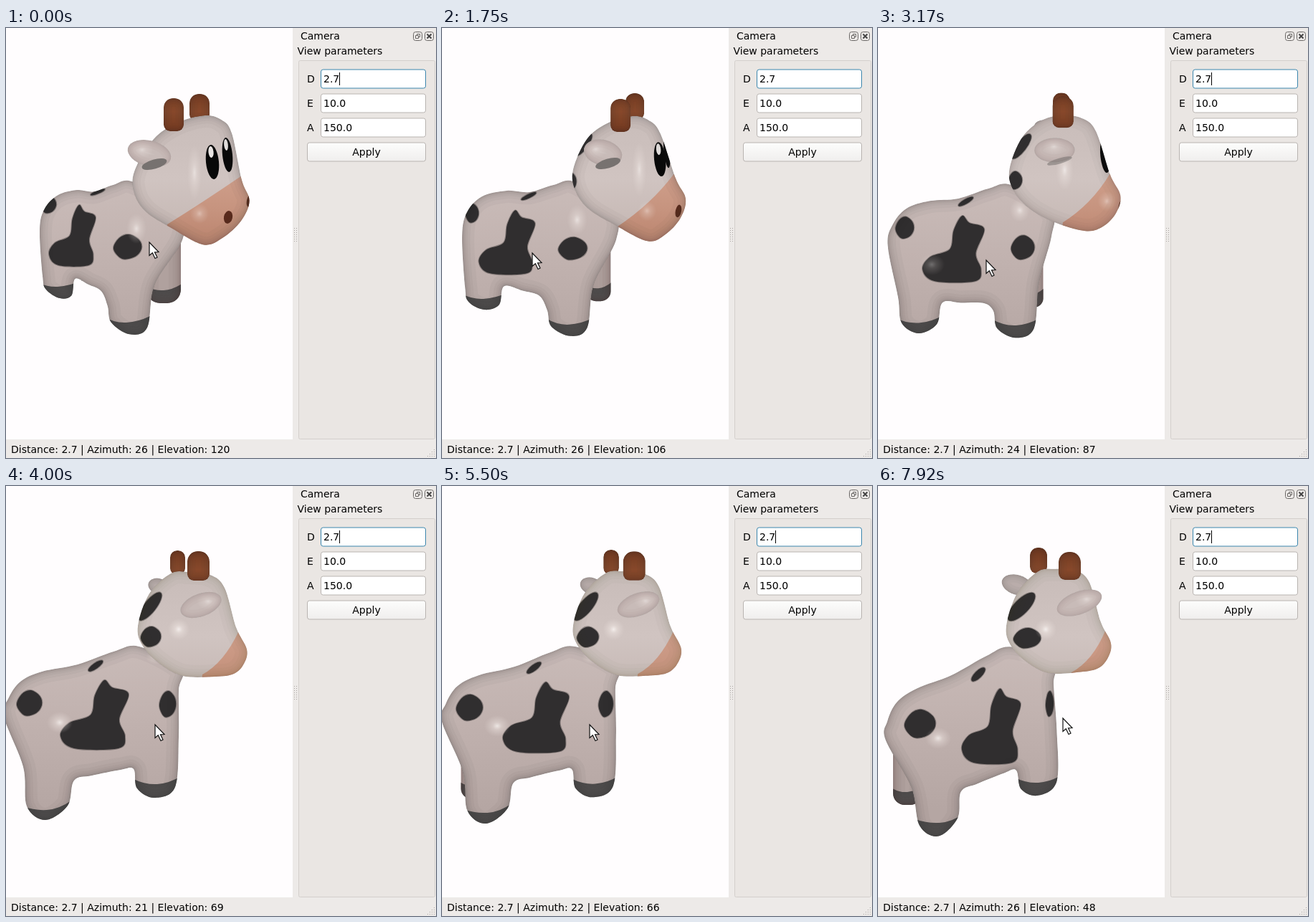
An HTML page with a canvas that plays this animation: 600 by 600 pixels, repeating every 8000 ms.

```html
<!DOCTYPE html>
<html lang="en">
<head>
<meta charset="utf-8">
<title>Camera</title>
<style>
html, body { margin: 0; width: 100%; height: 100%; overflow: hidden; background: #edeae8; }
#stage { position: absolute; left: 0; top: 0; width: 600px; height: 600px; overflow: hidden; font: 14px "DejaVu Sans", sans-serif; color: #111; }
canvas, svg { position: absolute; left: 0; top: 0; }
text { white-space: pre; }
</style>
</head>
<body>
<div id="stage">
<canvas id="view" width="400" height="574"></canvas>
<svg width="600" height="600">
  <defs>
    <linearGradient id="face" x2="0" y2="1"><stop stop-color="#fdfdfc"/><stop offset="1" stop-color="#f0eeed"/></linearGradient>
    <pattern id="dots" width="3" height="3" patternUnits="userSpaceOnUse"><rect width="1" height="1" fill="#aaa5a2"/></pattern>
  </defs>
  <rect x="408.5" y="45.5" width="190" height="528" rx="2" fill="#eae6e3" stroke="#d3cfcc"/>
  <rect x="402" y="278" width="4" height="20" fill="url(#dots)"/>
  <path d="M586 598L598 586V598Z" fill="url(#dots)"/>
  <g fill="none" stroke="#6b6866">
    <rect x="568.5" y="5.5" width="12" height="12" rx="3"/>
    <rect x="584.5" y="5.5" width="12" height="12" rx="3"/>
    <path d="M573.5 10V8.5h4v4h-2M571.5 10.5h4v4h-4z"/>
    <path d="M587.5 8.5l6 6m0-6l-6 6" stroke="#444" stroke-width="2"/>
  </g>
  <text x="411" y="16">Camera</text>
  <text x="406.5" y="37">View parameters</text>
  <g id="fields"></g>
  <rect x="420.5" y="160" width="165" height="26" rx="3" fill="url(#face)" stroke="#b9b4b1"/>
  <text x="503" y="178" text-anchor="middle">Apply</text>
  <rect id="caret" x="465" y="62" width="1" height="18"/>
  <text id="status" x="7" y="593"></text>
  <path id="pointer" d="M0 0V18.5L4.300 14.800L8 22.500L11 21L7.500 13.800L13 13.500Z" fill="#fff" stroke="#111" stroke-width="1.2"/>
</svg>
</div>
<script>
const LOOP = 8000, STEP = LOOP / 96;
const byId = id => document.getElementById(id);
const ctx = byId('view').getContext('2d');

byId('fields').innerHTML = ['D 2.7', 'E 10.0', 'A 150.0'].map((row, i) => {
  const [label, value] = row.split(' '), y = 58 + i * 34;
  return `<rect x="439.5" y="${y}" width="146" height="26" rx="3" fill="#fff" stroke="${i ? '#b9b4b1' : '#3b86ad'}"/>
    <text x="420" y="${y + 18}">${label}</text><text x="443" y="${y + 18}">${value}</text>`;
}).join('');

// time, turn, pointer x, pointer y, azimuth, elevation
const track = [
  [0, 0, 200, 299, 26, 120],
  [830, .88, 152, 311, 26, 112],
  [2500, 1, 105, 317, 26, 102],
  [4000, 2, 208, 333, 21, 69],
  [5500, 2.22, 206, 333, 22, 66],
  [6920, 2.38, 146, 320, 26, 54],
  [7920, 3, 258, 324, 26, 48]
];

// Outlines at turn 1 and turn 2; the warps carry them on to turn 0 and turn 3.
const body = {
  side: [186,215, 156,219, 122,229, 90,227, 55,235, 34,257, 27,290, 31,362, 36,383, 58,394, 79,387, 86,361, 112,367, 136,374, 147,394, 153,417, 180,430, 203,418, 212,358, 243,295, 240,255],
  rear: [186,224, 150,231, 100,249, 50,259, 20,273, 3,297, -3,322, 24,392, 29,447, 55,466, 86,446, 95,411, 120,404, 160,396, 178,395, 183,422, 207,435, 236,420, 241,350, 241,285, 244,255],
  before: (x, y) => [6 + 14 * Math.cos(Math.PI * (x - 27) / 150), -Math.max(0, 200 - x) * (y - 215) / 1500],
  after: (x, y) => [(y - 225) * (.14 - .0003 * x), 32 - .17 * x]
};
const head = {
  side: [265,123, 288,129, 304,147, 326,210, 340,238, 333,265, 312,288, 287,297, 241,274, 206,253, 187,228, 183,198, 202,155, 230,133],
  rear: [255,120, 285,124, 305,142, 321,197, 336,228, 332,248, 318,262, 292,266, 246,265, 213,247, 190,222, 184,195, 200,150, 230,122],
  before: (x, y) => [8 - (y - 150) * .15 + (x - 260) * .06, (y - 150) * .035],
  after: x => [-5 - (x - 184) * .04, -(x - 184) * .06]
};

// Spot outlines, placed by boxes: x, y, width, height at turns 0 to 3.
const splash = [137,271, 148,281, 171,290, 158,325, 166,348, 157,365, 95,365, 76,348, 88,330, 118,319, 124,292];
const blob = [172,288, 186,296, 189,308, 180,319, 162,322, 150,308, 158,293];
const boxes = {
  big: [[60,247,65,84], [51,255,79,88], [76,271,95,95], [117,283,82,103]],
  front: [[150,288,39,34], [163,292,40,31], [214,286,23,36], [234,286,11,35]],
  rump: [[48,234,22,24], [32,246,18,26], [15,285,35,35], [37,312,43,39]],
  back: [[118,225,20,8], [110,230,21,10], [115,244,20,14], [131,254,18,18]],
  crown: [null, [188,148,22,30], [186,149,30,38], [182,150,36,37]],
  nape: [null, [177,203,12,22], [188,196,28,28], [189,198,38,28]],
  horn: [[220,98,28,46], [236,99,28,46], [253,91,31,41], [252,92,31,39]],
  farHorn: [[256,92,28,38], [256,91,26,37], [229,90,21,34], [212,86,24,36]]
};
const spots = {
  ear: [[200,175,31,18], [226,174,27,18], [272,166,30,16], [281,163,33,16]],
  farEar: [null, null, [213,140,15,11], [194,138,22,14]],
  eye: [[288,187,9], [305,183,8], [332,172,5]],
  farEye: [[309,177,7], [314,171,4], [338,160,3]],
  nostril: [[310,264,6], [331,255,4], [350,240,3]],
  farNostril: [[340,241,4], [350,236,3]],
  hoof: [[72,361], [57,379], [57,452], [86,470]],
  frontHoof: [[168,411], [178,414], [211,416], [224,414]],
  farFront: [[220,384,24], [218,381,17], [212,400,13]],
  farHind: [null, null, [45,434,17], [41,445,20]],
  faceLight: [[263,202], [276,197], [241,200], [234,200]],
  muzzleLight: [[270,259], [287,255], [360,225]],
  chestLight: [[182,280], [189,267], [209,239]],
  rumpLight: [null, null, [75,330], [84,352]]
};
const muzzle = [[225,274,275,243,329,206], [245,278,293,246,323,204], [274,263,304,247,325,202], [270,260,300,244,318,200]];

const mix = (a, b, k) => a + (b - a) * k;
const clamp = v => Math.max(0, Math.min(1, v));
const blend = (a, b, k) => a.map((v, i) => mix(v, b[i], k));

function at(poses, turn) {
  const pick = i => poses[i] || poses.slice(i).find(Boolean) || poses[poses.length - 1];
  const i = Math.min(2, Math.floor(turn));
  return blend(pick(i), pick(i + 1), turn - i);
}

function sample(time) {
  const i = track.findIndex(row => row[0] > time);
  if (i < 0) return track[track.length - 1];
  const a = track[i - 1], b = track[i];
  return blend(a, b, (time - a[0]) / (b[0] - a[0]));
}

function smooth(v) {
  const path = new Path2D(), n = v.length / 2;
  const pt = i => { const k = (i + n) % n * 2; return [v[k], v[k + 1]]; };
  path.moveTo(v[0], v[1]);
  for (let i = 0; i < n; i++) {
    const [a, b, c, d] = [pt(i - 1), pt(i), pt(i + 1), pt(i + 2)];
    path.bezierCurveTo(b[0] + (c[0] - a[0]) / 6, b[1] + (c[1] - a[1]) / 6,
      c[0] - (d[0] - b[0]) / 6, c[1] - (d[1] - b[1]) / 6, c[0], c[1]);
  }
  path.closePath();
  return path;
}

function outline(form, turn) {
  const v = blend(form.side, form.rear, clamp(turn - 1));
  const warp = turn < 1 ? form.before : form.after;
  const amount = turn < 1 ? 1 - turn : clamp(turn - 2);
  for (let i = 0; i < v.length; i += 2) {
    const [dx, dy] = warp(v[i], v[i + 1]);
    v[i] += dx * amount;
    v[i + 1] += dy * amount;
  }
  return smooth(v);
}

function fitted(points, [x, y, w, h]) {
  const xs = points.filter((_, i) => i % 2 === 0), ys = points.filter((_, i) => i % 2);
  const fit = (v, list, start, size) => start + (v - Math.min(...list)) / (Math.max(...list) - Math.min(...list)) * size;
  return smooth(points.map((v, i) => i % 2 ? fit(v, ys, y, h) : fit(v, xs, x, w)));
}

function oval(x, y, rx, ry, tilt = 0) {
  const path = new Path2D();
  path.ellipse(x, y, rx, ry, tilt, 0, 2 * Math.PI);
  return path;
}

const streak = ([x, y, w, h]) => oval(x + w / 2, y + h / 2, Math.hypot(w, h) / 2, Math.min(w, h) * .28, -Math.atan2(h, w));

function rounded([x, y, w, h], top, bottom) {
  const path = new Path2D();
  path.roundRect(x, y, w, h, [top, top, bottom, bottom]);
  return path;
}

function vertical(y0, y1, ...colors) {
  const g = ctx.createLinearGradient(0, y0, 0, y1);
  colors.forEach((c, i) => g.addColorStop(i / (colors.length - 1), c));
  return g;
}

function fill(path, color) {
  ctx.fillStyle = color;
  ctx.fill(path);
}

// Fills a shape, draws details inside it and darkens it towards its edge.
function solid(path, color, shade, details = () => {}) {
  ctx.save();
  ctx.clip(path);
  fill(path, color);
  details();
  ctx.strokeStyle = `rgba(50,38,36,${shade})`;
  for (let w = 3; w < 40; w *= 1.5) {
    ctx.lineWidth = w;
    ctx.stroke(path);
  }
  ctx.restore();
}

function patch(path) {
  ctx.strokeStyle = 'rgba(48,45,46,.4)';
  ctx.lineWidth = 2;
  ctx.stroke(path);
  fill(path, '#302e2f');
}

function hoof(x, y, half, slant) {
  const path = new Path2D();
  path.moveTo(x - half, y - 9 + slant);
  path.quadraticCurveTo(x - half / 2, y + 1, x, y);
  path.quadraticCurveTo(x + half / 2, y - 1, x + half, y - 9 - slant);
  path.lineTo(x + half, y + 45);
  path.lineTo(x - half, y + 45);
  fill(path, vertical(y - 8, y + 22, '#4a4848', '#555353'));
}

function light(x, y, rx, ry, power) {
  const g = ctx.createRadialGradient(0, 0, 0, 0, 0, 1);
  g.addColorStop(0, `rgba(255,252,250,${power})`);
  g.addColorStop(.35, `rgba(250,242,238,${power / 2})`);
  g.addColorStop(1, 'rgba(240,230,226,0)');
  ctx.save();
  ctx.translate(x, y);
  ctx.scale(rx, ry);
  ctx.fillStyle = g;
  ctx.fillRect(-1, -1, 2, 2);
  ctx.restore();
}

function drawCow(turn) {
  const back = clamp(turn - 1), slant = 4 * back;
  const box = name => at(boxes[name], turn);
  const spot = name => at(spots[name], turn);

  const leg = name => {
    const [x, y, w] = spot(name);
    solid(rounded([x - w, y - 90, 2 * w, 90], 0, w * .8), '#b0a19e', .04, () => hoof(x, y - 18, w + 4, 2));
  };
  leg('farFront');
  if (turn > 1.9) leg('farHind');

  solid(outline(body, turn), vertical(215, 450, '#cabcb9', '#c0b1ae', '#b5a6a3'), .034, () => {
    patch(fitted(splash, box('big')));
    patch(fitted(blob, box('front')));
    patch(fitted(blob, box('rump')));
    patch(streak(box('back')));
    hoof(...spot('hoof'), 34, slant);
    hoof(...spot('frontHoof'), 33, slant / 2);
    light(...spot('chestLight'), 14, mix(21, 10, back), .6);
    light(...spot('rumpLight'), 18, 15, .7 * back);
  });

  const horn = name => {
    const b = box(name);
    solid(rounded(b, b[2] * .46, 9), vertical(88, 145, '#74391f', '#8b4a2b', '#77391f'), .035);
  };
  horn('farHorn');
  const [farX, ...farRest] = spot('farEar');
  solid(oval(farX + 35 * Math.max(0, 2 - turn), ...farRest, .3), '#bfb2af', .03);

  solid(outline(head, turn), vertical(120, 300, '#c8bcb9', '#d0c4c1', '#c3b5b1'), mix(.032, .024, back), () => {
    const [x0, y0, x1, y1, x2, y2] = at(muzzle, turn);
    const snout = new Path2D();
    snout.moveTo(x0, y0);
    snout.quadraticCurveTo(x1, y1, x2, y2);
    snout.lineTo(x2 + 60, y2);
    snout.lineTo(x2 + 60, y0 + 80);
    snout.lineTo(x0 - 6, y0 + 60);
    fill(snout, vertical(205, 305, '#cf9f8b', '#c6937e', '#b9826c'));

    const hidden = 30 * clamp(1 - turn);
    const [cx, ...crown] = box('crown'), [nx, ...nape] = box('nape');
    patch(streak([cx - hidden, ...crown]));
    patch(fitted(blob, [nx - hidden, ...nape]));
    for (const name of ['farEye', 'eye']) {
      const [x, y, r] = spot(name);
      fill(oval(x, y, r, 24, -.1), '#080808');
      fill(oval(x - 2, y - 14, r * .4, 8, -.1), '#e8e4e2');
    }
    for (const name of ['nostril', 'farNostril']) {
      const [x, y, r] = spot(name);
      fill(oval(x, y, r, 9, .2), '#592a1c');
    }
    light(...spot('faceLight'), mix(10, 15, back), mix(38, 15, back), mix(.5, .75, back));
    light(...spot('muzzleLight'), 13, 14, .4);
  });

  const ear = spot('ear'), tilt = mix(.25, -.35, back);
  solid(oval(...ear, tilt), '#cbbfbc', .02, () => light(ear[0] - 10 + 20 * back, ear[1] - 5, 16, 12, .45));
  fill(oval(ear[0] + 7, ear[1] + 15, 18, mix(6.5, .5, back), -.28), `rgba(119,114,112,${1 - back})`);
  horn('horn');
}

function caretShown(t) {
  if (t < 2000) return t % 1000 < 500;
  return t > 7700 || t >= 2900 && (t - 2900) % 1050 < 525;
}

function draw(now) {
  const time = Math.floor(now % LOOP / STEP + .05) * STEP;
  const [, turn, x, y, azimuth, elevation] = sample(time);
  ctx.fillStyle = '#fffdfe';
  ctx.fillRect(0, 0, 400, 574);
  drawCow(turn);
  byId('pointer').setAttribute('transform', `translate(${Math.round(x)} ${Math.round(y)})`);
  byId('status').textContent = `Distance: 2.7 | Azimuth: ${Math.round(azimuth)} | Elevation: ${Math.round(elevation)}`;
  byId('caret').style.opacity = caretShown(time) ? 1 : 0;
}

const start = performance.now();
function tick() {
  draw(performance.now() - start);
  requestAnimationFrame(tick);
}
tick();
</script>
</body>
</html>
```
